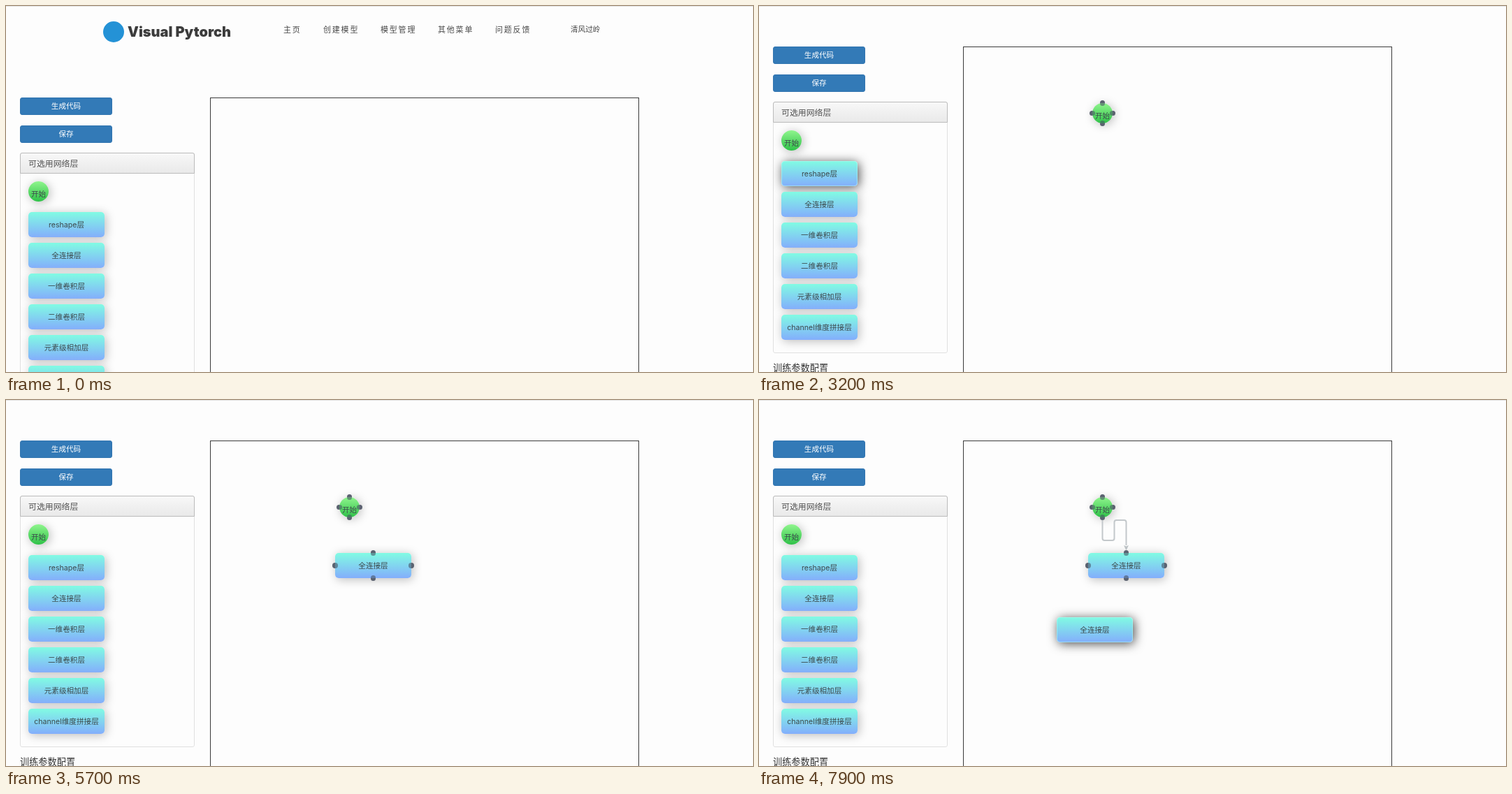
These frames come from a looping animation (1069x524 px, 8 s). An HTML page:

```html
<!DOCTYPE html>
<html lang="zh-CN">
<head>
<meta charset="utf-8">
<title>Visual Pytorch</title>
<style>
  :root {
    --rest: 2px 2px 14px #bbb;
    --lift: 2px 2px 15px #4a4a4a, inset 0 0 0 1px rgba(170, 255, 245, .55);
    --dot: #5b6270;
    --dot-in: rgba(70, 84, 100, .6);
  }
  html, body {
    margin: 0;
    width: 100%;
    height: 100%;
    overflow: hidden;
    background: #fdfdfd;
  }
  body {
    position: relative;
    font: 10.6px/20px Inter, "Noto Sans CJK SC", "Noto Sans CJK", sans-serif;
    color: #444;
    white-space: nowrap;
  }
  body * { box-sizing: border-box; }
  .page, .page > *, .node, .wire, .edge { position: absolute; }
  .page { inset: 0; animation: scroll 8s step-end infinite; }
  .edge { left: 0; top: 0; width: 100%; height: 1px; background: #e4e4e4; }

  .mark { left: 139px; top: 22px; width: 30px; height: 30px; border-radius: 50%; background: #2492d6; }
  .brand { left: 174px; top: 27px; font-size: 20px; font-weight: 900; color: #3c3c3c; }
  .nav { top: 24px; font-size: 11px; letter-spacing: 1.8px; color: #484848; }
  .user { left: 808px; top: 24px; }

  .btn {
    left: 20px; width: 132px; height: 25px;
    border: 1px solid #3275b0; border-radius: 3px;
    background: #337ab7; color: #fff;
    text-align: center; line-height: 23px;
  }
  .panel { left: 20px; top: 210px; width: 250px; height: 360px; border: 1px solid #e0e0e0; border-radius: 3px; }
  .head {
    left: 20px; top: 210px; width: 250px; height: 30px;
    border: 1px solid #bbb; border-radius: 3px 3px 0 0;
    background: linear-gradient(#f8f8f8, #e9e9e9);
    padding-left: 11px; font-size: 11.9px; line-height: 29px; color: #555;
  }
  .next { left: 20px; top: 581px; font-size: 13.2px; color: #333; }
  .board { left: 292px; top: 131px; width: 614px; height: 600px; border: 1px solid #3a3a3a; }

  .start, .layer { text-align: center; color: #3c4a4c; box-shadow: var(--rest); }
  .start {
    width: 29px; height: 29px; border-radius: 50%;
    background: linear-gradient(#8ff58d, #2fc148);
    line-height: 37px;
  }
  .layer {
    width: 109px; height: 36px; border-radius: 5px;
    background: linear-gradient(#81fbe3, #83aefc);
    line-height: 37px;
  }
  .page .start { left: 32px; top: 251px; animation: hover-start 8s step-end infinite; }
  .page .layer { left: 32px; top: calc(295px + 43.9px * var(--i)); animation: 8s step-end infinite; }
  .page .reshape { animation-name: hover-reshape; }
  .page .linear { animation-name: hover-linear; }
  .page .conv { animation-name: hover-conv; }

  .node { left: 0; top: 0; opacity: 0; animation: 8s step-end infinite; }
  #a { animation-name: drag-a; }
  #b { animation-name: drag-b; }
  #c { animation-name: drag-c; }

  /* four connection points, the inner half seen through the node */
  .dots { position: absolute; inset: 0; opacity: 0; animation: 8s step-end infinite; }
  #a .dots { animation-name: dots-a; }
  #b .dots { animation-name: dots-b; }
  .dots i {
    position: absolute; left: var(--x); top: var(--y);
    width: 7.4px; height: 7.4px; margin: -3.7px; border-radius: 50%;
    background: linear-gradient(var(--to), var(--dot) 50%, var(--dot-in) 50%);
  }
  .n { --x: 50%; --y: 0%; --to: to bottom; }
  .e { --x: 100%; --y: 50%; --to: to left; }
  .s { --x: 50%; --y: 100%; --to: to top; }
  .w { --x: 0%; --y: 50%; --to: to right; }

  .wire { left: 0; top: 0; opacity: 0; animation: show-wire 8s step-end infinite; }
  .wire .line { fill: none; stroke: #c3c8cb; stroke-width: 2; animation: route 8s step-end infinite; }

  @keyframes scroll {
    0% { transform: none; }
    16.25% { transform: translateY(-37px); }
    17.5%, 100% { transform: translateY(-73px); }
  }
  @keyframes hover-start {
    0%, 27.5%, 100% { box-shadow: var(--rest); }
    23.75% { box-shadow: var(--lift); }
  }
  @keyframes hover-reshape {
    0%, 43.75%, 100% { box-shadow: var(--rest); }
    40% { box-shadow: var(--lift); }
  }
  @keyframes hover-linear {
    0%, 45%, 53.75%, 96.25%, 100% { box-shadow: var(--rest); }
    43.75%, 50%, 92.5% { box-shadow: var(--lift); }
  }
  @keyframes hover-conv {
    0%, 48.75%, 100% { box-shadow: var(--rest); }
    46.25% { box-shadow: var(--lift); }
  }
  @keyframes drag-a {
    0% { opacity: 0; box-shadow: var(--lift); transform: translate(32px, 178px); }
    27.5% { opacity: 1; transform: translate(193px, 171px); }
    28.75% { transform: translate(419px, 154px); }
    30% { transform: translate(460px, 148px); }
    31.25% { transform: translate(476px, 140px); }
    32.5% { transform: translate(477px, 139px); }
    35%, 100% { opacity: 1; box-shadow: var(--rest); transform: translate(477px, 139px); }
  }
  @keyframes drag-b {
    0% { opacity: 0; box-shadow: var(--lift); transform: translate(32px, 266px); }
    53.75% { opacity: 1; transform: translate(110px, 261px); }
    55% { transform: translate(440px, 228px); }
    56.25% { transform: translate(458px, 226px); }
    57.5% { transform: translate(469px, 222px); }
    58.75% { transform: translate(472px, 220px); }
    60% { transform: translate(471px, 219px); }
    71.25% { box-shadow: var(--rest); }
    75% { box-shadow: var(--lift); }
    85%, 100% { opacity: 1; box-shadow: var(--rest); transform: translate(471px, 219px); }
  }
  @keyframes drag-c {
    0% { opacity: 0; box-shadow: var(--lift); transform: translate(32px, 266px); }
    96.25% { opacity: 1; transform: translate(178px, 285px); }
    97.5% { transform: translate(359px, 302px); }
    98.75%, 100% { opacity: 1; box-shadow: var(--lift); transform: translate(426px, 311px); }
  }
  @keyframes dots-a {
    0% { opacity: 0; }
    35%, 100% { opacity: 1; }
  }
  @keyframes dots-b {
    0% { opacity: 0; }
    71.25%, 100% { opacity: 1; }
  }
  @keyframes show-wire {
    0% { opacity: 0; }
    72.5%, 100% { opacity: 1; }
  }
  @keyframes route {
    0%, 72.5% { d: path("M491.5 172V199q0 2 2 2h0q2 0 2-2V149q0-2 2-2h0q2 0 2 2V184"); }
    73.75% { d: path("M491.5 172V198q0 3 3 3h4q3 0 3-3V164q0-3 3-3h4q3 0 3 3V198"); }
    75% { d: path("M491.5 172V198q0 3 3 3h8q3 0 3-3V175q0-3 3-3h8q3 0 3 3V208"); }
    77.5% { d: path("M491.5 172V198q0 3 3 3h9q3 0 3-3V175q0-3 3-3h9q3 0 3 3V208"); }
    78.75% { d: path("M491.5 172V198q0 3 3 3h10q3 0 3-3V175q0-3 3-3h10q3 0 3 3V208"); }
    82.5%, 100% { d: path("M491.5 172V198q0 3 3 3h11q3 0 3-3V175q0-3 3-3h11q3 0 3 3V208"); }
  }
</style>
</head>
<body>
  <div class="page">
    <div class="mark"></div>
    <div class="brand">Visual Pytorch</div>
    <div class="nav" style="left:397px">主页</div>
    <div class="nav" style="left:454px">创建模型</div>
    <div class="nav" style="left:536px">模型管理</div>
    <div class="nav" style="left:618px">其他菜单</div>
    <div class="nav" style="left:700px">问题反馈</div>
    <div class="user">清风过岭</div>

    <div class="btn" style="top:131px">生成代码</div>
    <div class="btn" style="top:171px">保存</div>
    <div class="panel"></div>
    <div class="head">可选用网络层</div>
    <div class="start">开始</div>
    <div class="layer reshape" style="--i:0">reshape层</div>
    <div class="layer linear" style="--i:1">全连接层</div>
    <div class="layer conv" style="--i:2">一维卷积层</div>
    <div class="layer" style="--i:3">二维卷积层</div>
    <div class="layer" style="--i:4">元素级相加层</div>
    <div class="layer" style="--i:5">channel维度拼接层</div>
    <div class="next">训练参数配置</div>
    <div class="board"></div>
  </div>

  <div class="node start" id="a">开始<div class="dots"><i class="n"></i><i class="e"></i><i class="s"></i><i class="w"></i></div></div>
  <div class="node layer" id="b">全连接层<div class="dots"><i class="n"></i><i class="e"></i><i class="s"></i><i class="w"></i></div></div>
  <div class="node layer" id="c">全连接层</div>

  <svg class="wire" width="1069" height="524">
    <marker id="tip" markerUnits="userSpaceOnUse" markerWidth="8" markerHeight="8" refX="0" refY="4" orient="auto">
      <path d="M0 .5L7.5 4L0 7.5L1.5 4z" fill="#bcc2c5"/>
    </marker>
    <path class="line" marker-end="url(#tip)"/>
  </svg>
  <div class="edge"></div>
</body>
</html>
```
